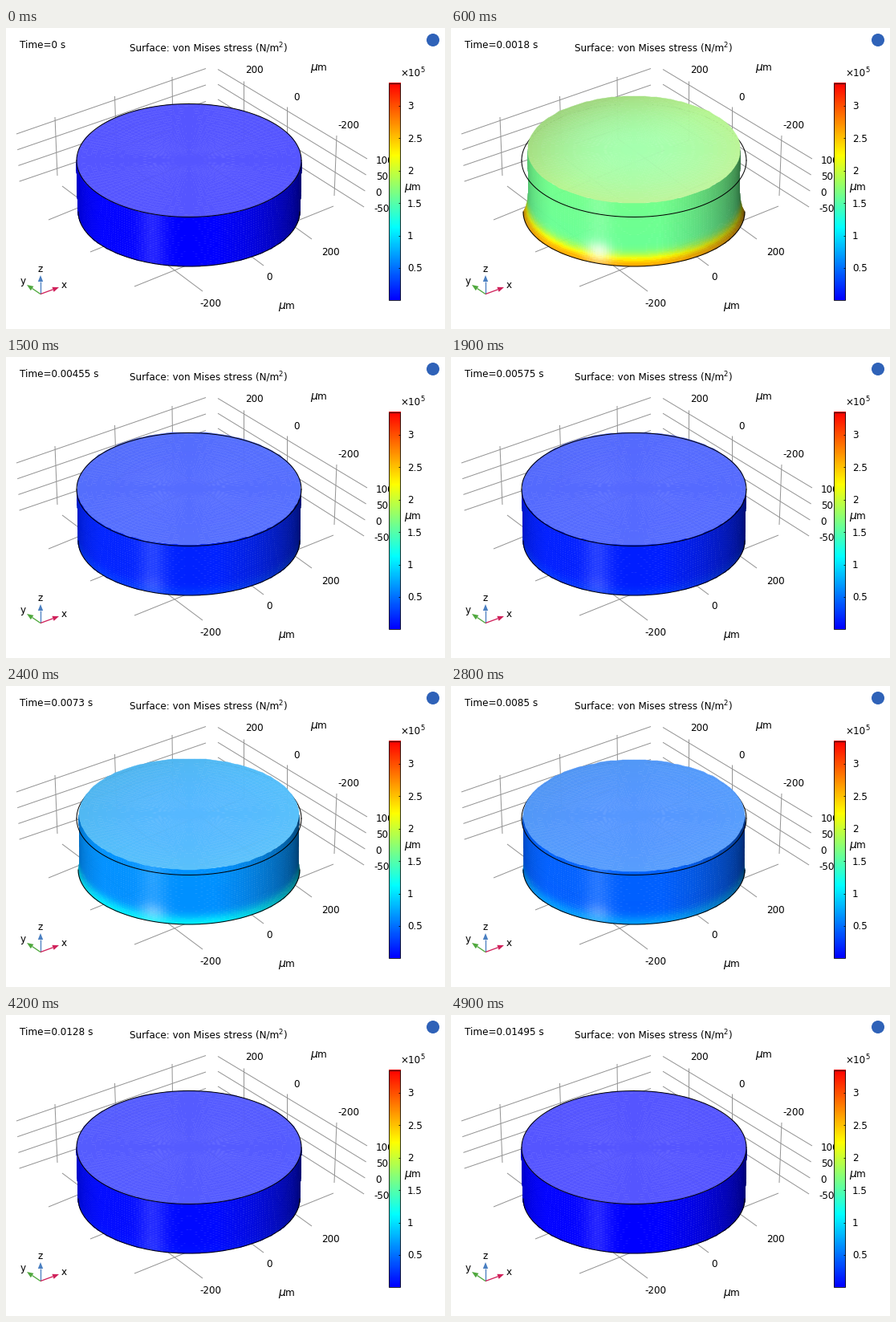
A matplotlib script for the animation above (5 s loop, 547 by 375 pixels).

```python
import numpy as np
import matplotlib.pyplot as plt
from matplotlib.animation import FuncAnimation
from matplotlib.colors import LinearSegmentedColormap
from matplotlib.patches import Circle, Polygon, Rectangle

W, H, DPI = 547, 375, 72
FRAMES, INTERVAL = 50, 100
STEP, LAST_STEP = 0.00005, 299
PULSE = 0.005
PULSE_AMPS = (1.0, 0.33, 0.022)

rainbow = LinearSegmentedColormap.from_list(
    "rainbow", [(0, "#0000ff"), (1 / 3, "#00ffff"), (2 / 3, "#ffff00"), (1, "#ff0000")], N=512)

plt.rcParams["font.family"] = "DejaVu Sans"
fig = plt.figure(figsize=((W + 1e-6) / DPI, (H + 1e-6) / DPI), dpi=DPI, facecolor="white")
ax = fig.add_axes([0, 0, 1, 1])


def line(x0, y0, x1, y1, color="#949494", lw=1.0, z=1):
    ax.plot([x0, x1], [y0, y1], color=color, lw=lw, zorder=z, solid_capstyle="butt")


def label(x, y, text, size=12, z=2, **kw):
    return ax.text(x, y, text, fontsize=size, va="baseline", ha="left", zorder=z, **kw)


def micron(x, y):
    label(x, y, "μ", 14, z=8, style="italic")
    label(x + 8.5, y, "m", z=8)


def draw_grid():
    for i in range(4):
        line(13 + 1.2 * i, 132 + 19.7 * i, 249, 50.5 + 20.5 * i)
        line(264, 51.5 + 18.7 * i, 450 - 1.3 * i, 163 + 20 * i)
    walls = [(61, 111, 64, 184), (135.5, 85, 138, 160), (207, 61, 208, 138),
             (296, 66, 296, 140), (350, 98, 350, 172), (412, 134, 409, 209)]
    floor = [(70, 197, 245, 328), (138, 160, 321, 296), (208, 138, 381, 263),
             (53, 239, 296, 140), (105, 279, 350, 180), (160, 322, 408, 222)]
    for seg in walls + floor:
        line(*seg)


def draw_labels():
    for x, y, text in [(298, 56, "200"), (358, 90, "0"), (413, 125, "-200"),
                       (393, 283, "200"), (324, 314, "0"), (241, 347, "-200"),
                       (461, 169, "100"), (461, 189, "50"), (460, 209, "0"), (458, 229, "-50")]:
        label(x, y, text)
    for x, y in [(379, 53), (339, 350), (496, 202)]:
        micron(x, y)
    label(154, 28.5, "Surface: von Mises stress (N/m")
    label(339.5, 23.5, "2", 8.5)
    label(345, 28.5, ")")


def draw_colorbar():
    left, right, top, bottom = 477, 491, 69.5, 339.5
    ax.imshow(np.linspace(1, 0, 271)[:, None], cmap=rainbow, aspect="auto",
              extent=(left, right, bottom, top), zorder=5)
    ax.add_patch(Rectangle((left, top), right - left, bottom - top, fill=False,
                           ec="black", lw=0.8, zorder=6))
    for k in range(1, 7):
        y = 339.5 - 40.4 * k
        line(488.5, y, 491, y, "black", 0.8, 7)
        label(500, y + 4.3, f"{k / 2:g}", z=7)
    label(491.5, 60, "×10", z=7)
    label(516.5, 55, "5", 8.5, z=7)


def draw_triad():
    origin = np.array([43.0, 331.5])
    for tip, color, name, pos in [((43, 308), "#4a7fc1", "z", (39.5, 304)),
                                  ((66, 323), "#d0205a", "x", (69, 324)),
                                  ((26, 320), "#4fa83d", "y", (18, 319))]:
        tip = np.array(tip, float)
        along = (tip - origin) / np.hypot(*(tip - origin))
        side = np.array([-along[1], along[0]]) * 3.2
        base = tip - 8 * along
        line(*origin, *base, color, 1.3)
        ax.add_patch(Polygon([tip, base + side, base - side], fc=color, ec="none", zorder=2))
        label(*pos, name)


def load(t):
    """Squared-sine pulses, each weaker than the one before."""
    k = min(int(t / PULSE + 1e-9), len(PULSE_AMPS) - 1)
    return PULSE_AMPS[k] * np.sin(np.pi * t / PULSE) ** 2


def ring(v, s):
    """Centre y and semi-axes of the disc at height v (0 base, 1 top) under load s."""
    scale = 1 - s * (0.075 * (1 - np.exp(-v / 0.15)) - 0.009 * v)
    return 229 - (64 + 16.5 * s) * v, (138 + 2 * v) * scale, (68 + 2.5 * v) * scale


def mesh(x, y, rgb):
    return ax.pcolormesh(x, y, np.clip(rgb, 0, 1), zorder=3, edgecolors="face",
                         linewidth=0.4, antialiased=True)


def middles(a):
    return (a[1:] + a[:-1]) / 2


def side_mesh(s):
    phi = np.linspace(-np.pi / 2, np.pi / 2, 121)
    v = np.linspace(0, 1, 41)[:, None]
    cy, rx, ry = ring(v, s)
    x, y = 228 + rx * np.sin(phi), cy + ry * np.cos(phi)

    p, u = middles(phi)[None, :], middles(v)
    value = s * (0.57 + 0.02 * u + 0.38 * np.exp(-(u / 0.15) ** 2)) + 0 * p
    diffuse = np.minimum(1, 0.58 + 0.5 * np.cos(p + 0.33))
    glint = np.exp(-((138 * np.sin(p) + 45) / 17) ** 2)
    glint = glint * (0.14 + 0.75 * s * np.exp(-((u - 0.17) / 0.15) ** 2))
    rgb = rainbow(value)[..., :3] * diffuse[..., None]
    return mesh(x, y, rgb + (1 - rgb) * glint[..., None])


def top_mesh(s):
    phi = np.linspace(0, 2 * np.pi, 121)
    r = np.linspace(0, 1, 25)[:, None]
    cy, rx, ry = ring(1, s)
    x, y = 228 + rx * r * np.cos(phi), cy + ry * r * np.sin(phi)

    p, q = middles(phi)[None, :], middles(r)
    facing = q ** 2 * (np.cos(p) + np.sin(p)) * 0.6
    white = 1 / 3 + 0.12 * s * np.maximum(facing, 0)
    shade = 1 - 0.18 * s * np.maximum(-facing, 0) - 0.05 * s * q ** 2
    rgb = rainbow(s * (0.60 + 0.06 * q ** 2) + 0 * p)[..., :3]
    rgb = rgb * (1 - white[..., None]) + white[..., None]
    return mesh(x, y, rgb * shade[..., None])


def arc(v, start, end, z):
    a = np.linspace(start, end, 150)
    cy, rx, ry = ring(v, 0)
    return ax.plot(228 + rx * np.cos(a), cy + ry * np.sin(a), color="black", lw=1, zorder=z)[0]


def time_text(step):
    t = step * STEP
    if 0 < t < 0.001:
        return f"Time={t * 1e4:g}E-4 s"
    return f"Time={t:.4g} s"


draw_grid()
draw_labels()
draw_colorbar()
draw_triad()
ax.add_patch(Circle((532, 15), 8, fc="#2f62b8", ec="none", zorder=2))
arc(0, 0, np.pi, 4)
arc(1, 0, np.pi, 4)
back_edge = arc(1, np.pi, 2 * np.pi, 4)
clock = label(17, 25, "")
body = []

ax.set_xlim(0, W)
ax.set_ylim(H, 0)
ax.set_autoscale_on(False)
ax.axis("off")


def update(i):
    step = i * LAST_STEP // (FRAMES - 1)
    s = load(step * STEP)
    while body:
        body.pop().remove()
    body.extend([side_mesh(s), top_mesh(s)])
    # the back edge disappears behind the raised top
    back_edge.set_zorder(4 if s < 0.08 else 2)
    clock.set_text(time_text(step))
    return body + [back_edge, clock]


anim = FuncAnimation(fig, update, frames=FRAMES, interval=INTERVAL, repeat=True,
                     blit=False, cache_frame_data=False)
plt.show()
```
